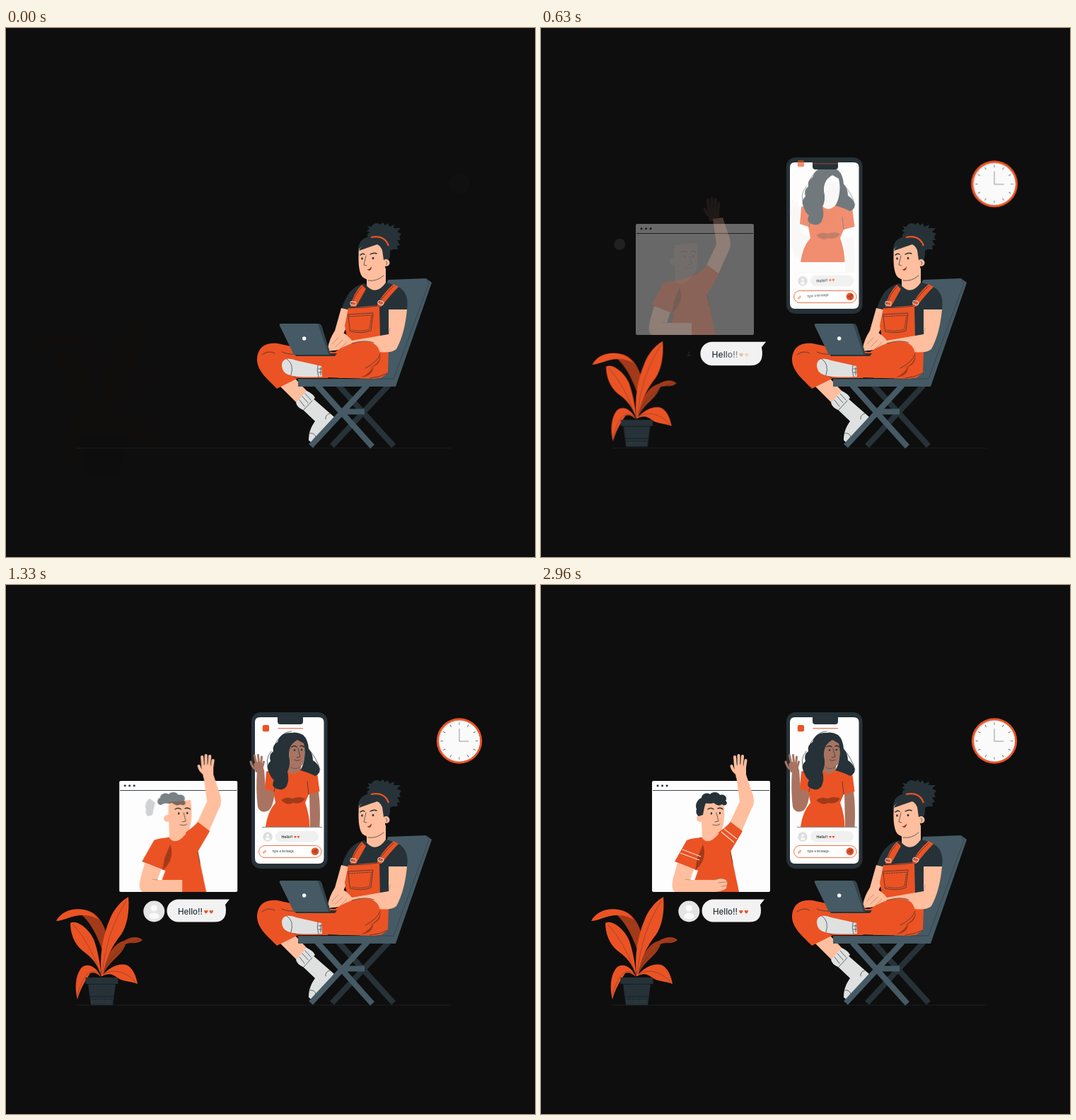
Animation, 748 px wide and 748 px high, one loop 3000 ms. Source, as an HTML page without scripts:

```html
<!DOCTYPE html>
<html lang="en">
<head>
<meta charset="utf-8">
<title>Video chat</title>
<style>
html, body { margin: 0; width: 100%; height: 100%; overflow: hidden; background: #0e0e0e; }
svg { display: block; width: 100vw; height: 100vh; }
text { font-family: Inter, "Open Sans", sans-serif; fill: #263238; }

.or { fill: #eb5324; }
.rust { fill: #a23a19; }
.ink { fill: #263238; }
.slate { fill: #455a64; }
.skin { fill: #ffbe9d; }
.tan { fill: #a87461; }
.sock { fill: #dfe1e1; }
.line { fill: none; stroke: #263238; stroke-width: .7; stroke-linecap: round; stroke-linejoin: round; }
.thick { stroke-width: 1.4; }
.fingers { fill: none; stroke-linecap: round; stroke-width: 4; }

/* springy entrances */
.enter, .fade, .row, .bust, .limb, .slide, .hair, .burn, .late {
  animation: 3s cubic-bezier(.36, -.01, .5, 1.38) infinite;
}
.enter { animation-name: enter; }
.fade { animation-name: fade; }
.row { animation-name: row; --from: translateY(-20px); }
.bust { animation-name: bust; --from: translateY(-40px); }
.limb { animation-name: limb; }
.slide { animation-name: slide; }
.hair { animation-name: hair; --from: translateX(-32px); }
.burn { animation-name: burn; --from: translateX(-32px); }
.late { animation-name: late; }

/* hand-timed parts */
.pane, .man, .part, .disc, .icon, .wipe, .note { animation: 3s linear infinite; }
.pane { animation-name: pane; }
.man { animation-name: man; }
.part { animation-name: part; }
.disc { animation-name: disc; transform-origin: 0 129px; }
.icon { animation-name: icon; transform-origin: 209px 460px; }
.wipe { animation-name: wipe; }
.note { animation-name: note; transform-origin: var(--at); }

@keyframes enter {
  0% { opacity: .013; transform: var(--from); animation-timing-function: cubic-bezier(.33, .18, .5, 1.36); }
  23%, 100% { opacity: 1; transform: none; }
}
@keyframes fade {
  0% { opacity: .013; animation-timing-function: cubic-bezier(.33, .18, .5, 1.36); }
  23%, 100% { opacity: 1; }
}
@keyframes row {
  0%, 5.5% { opacity: 0; transform: var(--from); }
  30.5%, 100% { opacity: 1; transform: none; }
}
@keyframes bust {
  0%, 9.7% { opacity: 0; transform: var(--from); }
  34.7%, 100% { opacity: 1; transform: none; }
}
@keyframes limb {
  0%, 18.5% { opacity: 0; }
  43.5%, 100% { opacity: 1; }
}
@keyframes slide {
  0% { transform: translateX(-55px); }
  50%, 100% { transform: none; }
}
@keyframes hair {
  0%, 33.5% { opacity: 0; transform: var(--from); }
  58.5%, 100% { opacity: 1; transform: none; }
}
@keyframes burn {
  0%, 38.3% { opacity: 0; transform: var(--from); }
  63.3%, 100% { opacity: 1; transform: none; }
}
@keyframes late {
  0%, 52% { opacity: 0; transform: translateX(-14px); }
  77%, 100% { opacity: 1; transform: none; }
}
@keyframes pane {
  0%, 7% { opacity: 0; }
  11% { opacity: .035; }
  21% { opacity: .38; }
  27.7% { opacity: .77; }
  36%, 100% { opacity: 1; }
}
@keyframes man {
  0%, 8% { opacity: 0; transform: translateX(-4px); }
  11% { opacity: .03; transform: translateX(-4px); }
  21% { opacity: .25; transform: translateX(-10px); }
  27.7% { opacity: .62; transform: translateX(-12px); }
  42%, 100% { opacity: 1; transform: none; }
}
@keyframes part {
  0%, 11% { opacity: 0; transform: translateX(-6px); }
  21% { opacity: .28; transform: translateX(-5px); }
  27.7% { opacity: .45; transform: translateX(-4px); }
  42%, 100% { opacity: 1; transform: none; }
}
@keyframes disc {
  0%, 8% { opacity: 0; transform: scale(0); }
  21% { opacity: .09; transform: scale(.53); }
  27.7% { opacity: .65; transform: scale(.85); }
  33.5% { opacity: 1; transform: scale(1.05); }
  37.7% { transform: scale(1.03); }
  42%, 100% { opacity: 1; transform: none; }
}
@keyframes icon {
  0%, 18% { opacity: 0; transform: scale(.2); }
  21% { opacity: .07; transform: scale(.35); }
  27.7% { opacity: .5; transform: none; }
  38%, 100% { opacity: 1; transform: none; }
}
@keyframes wipe {
  0% { transform: translateX(-130px); }
  35%, 100% { transform: none; }
}
@keyframes note {
  0%, 6% { opacity: 0; transform: translateY(-12px) rotate(-20deg); }
  11% { opacity: .5; transform: translateY(-5px) rotate(-16deg); }
  21% { opacity: .9; transform: rotate(-4deg); }
  25%, 100% { opacity: 1; transform: none; }
}
</style>
</head>
<body>
<svg viewBox="0 0 748 748">
<defs>
  <linearGradient id="edge" gradientUnits="userSpaceOnUse" x1="306" x2="351" y1="0" y2="0">
    <stop stop-color="#fff"/><stop offset="1" stop-color="#fff" stop-opacity="0"/>
  </linearGradient>
  <mask id="reveal" maskUnits="userSpaceOnUse" x="200" y="430" width="140" height="60">
    <rect class="wipe" x="100" y="430" width="400" height="60" fill="url(#edge)"/>
  </mask>
  <path id="heart" class="or" d="M0 2.7C-3.6 .4-2.8-2.4-1.2-2.2Q-.2-2 0-1 .2-2 1.2-2.2C2.8-2.4 3.6.4 0 2.7Z"/>
  <g id="user"><circle cy="-4" r="4.6"/><path d="M-7.5 9Q-7.5 2.5 0 2.5T7.5 9Q0 14.5-7.5 9Z"/></g>
</defs>

<path d="M100 594H629" stroke="#1d2123" stroke-width=".9"/>

<!-- clock -->
<g class="enter" style="--from:scale(.5);transform-origin:641px 220.5px">
  <circle class="or" cx="641" cy="220.5" r="32.2"/>
  <circle cx="641" cy="220.5" r="29.2" fill="#dedfe0"/>
  <circle cx="641.8" cy="220.8" r="28.2" fill="#fafafa"/>
  <circle cx="641" cy="220.5" r="24.5" fill="none" stroke="#455a64" stroke-width="3.4" pathLength="120" stroke-dasharray=".6 9.4" stroke-dashoffset=".3"/>
  <path class="line" stroke-opacity=".7" d="M641 203.500V221H654"/>
</g>

<!-- plant -->
<g class="enter" style="--from:scale(1.5);transform-origin:132px 517.5px">
  <path class="rust" d="M100 461C122 454 136 473 141 490L137 518C130 500 121 475 100 461Z"/>
  <path class="rust" d="M137 552C138 530 151 507 167 503 178 496 188 497 193 502 186 509 175 504 169 508 163 526 146 530 137 552Z"/>
  <path class="or" d="M71 475C78 461 95 456 110 459Q122 461 131 473 120 466 108 467C92 467 82 475 71 475Z"/>
  <path class="or" d="M135 553C132 525 136 498 147 472 153 457 164 446 173 441 175 462 171 482 163 494 150 510 140 530 137 553Z"/>
  <path class="or" d="M91 478C100 472 118 487 124 501 130 517 133 535 135 554 129 535 121 526 108 517 96 507 91 492 91 478Z"/>
  <path class="or" d="M134 554C128 539 114 533 106 542 98 553 97 570 101 586 105 571 112 560 119 549Q126 546 134 554Z"/>
  <path class="or" d="M136 552C146 541 160 533 172 538 180 543 184 553 186 564 176 560 165 561 157 555 150 549 143 549 136 553Z"/>
  <path class="line" stroke-opacity=".5" d="M136 550Q142 490 170 447M134 550Q118 505 95 480M132 550Q113 535 101 580M138 550Q160 538 183 561M139 545Q151 516 188 501"/>
  <path class="ink" d="M112.500 555H158.500V564H155L151 594H120L116 564H112.500Z"/>
  <path d="M116 564.500H155M119 582H152M120 586H151" stroke="#172023" fill="none"/>
  <path d="M121 588H150" stroke="#455a64" stroke-width="6" stroke-dasharray=".7 2.6" stroke-opacity=".5"/>
</g>

<!-- browser window -->
<g class="slide">
  <g class="pane">
    <rect x="157" y="277" width="167" height="157" rx="2" fill="#fdfdfd"/>
    <path d="M158 290.500H323" stroke="#263238" stroke-width=".9"/>
    <g class="ink"><circle cx="165" cy="283.7" r="1.5"/><circle cx="171.5" cy="283.7" r="1.5"/><circle cx="178" cy="283.7" r="1.5"/></g>
  </g>
  <g class="man">
    <path class="skin" d="M266 338L281 306 276 270 290 268 300 298Q303 309 297 318L282 352Z"/>
    <g class="part">
      <path class="skin" d="M276 273L273 257Q281 250 290 257L290 272Z"/>
      <path class="fingers" stroke="#ffbe9d" d="M275 256L274 243M279.500 255L279.500 241M284 255L285 242M288 258L289.500 248M276 266Q271 262 269.500 256"/>
      <path class="line" stroke-opacity=".35" d="M277 255V248M282 254V247M286 256V249"/>
    </g>
    <path class="or" d="M206 361C214 357 229 358 240 353 252 350 261 343 268 335L285 348 268 377 280 434H219L217 418 222 404 189 391Z"/>
    <path class="rust" d="M229 367C234 381 229 395 218 403L221 386Z"/>
    <path class="line" d="M268 377L271 393"/>
    <path class="skin" d="M193 393L216 402 211 417 246 417V434H190Q183 431 187 414Z"/>
    <path class="line" stroke-opacity=".4" d="M211 417L204 416"/>
    <g class="part">
      <path class="skin" d="M227 335L228 358Q237 369 251 352V340Z"/>
      <circle class="skin" cx="225" cy="330" r="5"/>
      <path class="skin" d="M227 307C226 322 226 334 229 343 235 355 248 355 256 345 260 335 260 318 258 304Z"/>
      <path class="line" d="M248 322L251 334 246 335M243 339Q249 341 253 338"/>
      <path class="line thick" d="M236 317Q240 314 244 317M250 316Q254 314 257 317"/>
      <g class="ink"><ellipse cx="241" cy="323" rx="1.2" ry="1.7"/><ellipse cx="253" cy="322.5" rx="1.2" ry="1.7"/></g>
    </g>
    <path class="hair ink" d="M229 311C223 312 221 303 227 301 227 295 235 293 239 296 243 291 251 293 253 297 260 295 264 301 261 305 266 309 260 314 256 310 251 314 247 310 244 308 239 311 234 306 229 311Z"/>
    <path class="burn ink" d="M225 302C219 306 218 313 220 317 218 322 221 326 223 327L229 325C230 319 231 314 233 308Z"/>
    <g class="late">
      <path class="skin" d="M244 417L252 415Q263 415 263.500 421L262 429Q255 434 244 434Z"/>
      <path class="line" stroke-opacity=".55" d="M251 421L263 420M255 426L263 425M245 417L252 415"/>
      <path fill="none" stroke="#ffd9c8" stroke-width="1.3" d="M200 374L226 384M197 379L224 389M255 349L273 364M259 345L277 359"/>
    </g>
  </g>
</g>

<!-- speech bubble -->
<g class="disc"><circle cx="209.3" cy="461.5" r="15" fill="#e4e4e4"/></g>
<g class="icon"><use href="#user" x="209.3" y="461" fill="#fafafa"/></g>
<g class="enter" style="--from:scale(0);transform-origin:272px 461px"><g class="fade">
  <path fill="#f2f2f2" d="M243.500 444.500H316L310 452Q311 456 311 460 311 476.500 295 476.500H243.500A16 16 0 0 1 243.500 444.500Z"/>
  <g mask="url(#reveal)">
    <text x="243" y="465.5" font-size="11.5" font-weight="500">Hello!!</text>
    <use href="#heart" x="282.8" y="462"/><use href="#heart" x="290.3" y="462"/>
  </g>
</g></g>

<!-- phone -->
<g class="enter" style="--from:translateY(-62px)"><g class="fade">
  <rect class="ink" x="347" y="180" width="107.5" height="221" rx="13"/>
  <path fill="#fdfdfd" d="M359 187H384V193Q384 197 388 197H416Q420 197 420 193V187H442Q449.500 187 449.500 194V386Q449.500 394 442 394H359Q352 394 352 386V194Q352 187 359 187Z"/>
  <g class="row">
    <circle cx="370" cy="356" r="6.7" fill="#dcdddd"/>
    <use href="#user" fill="#fafafa" transform="translate(370 356) scale(.43)"/>
    <rect x="381" y="348" width="61" height="15.6" rx="7.8" fill="#f0f0f0"/>
    <g class="note" style="--at:389px 358px">
      <text x="389.5" y="357.7" font-size="5.1" font-weight="600">Hello!!</text>
      <use href="#heart" transform="translate(409 356.2) scale(.62)"/><use href="#heart" transform="translate(413.5 356.2) scale(.62)"/>
    </g>
  </g>
  <rect x="357.5" y="368.5" width="88.5" height="17" rx="8.5" fill="#fff" stroke="#eb5324" stroke-width=".8"/>
  <circle class="or" cx="437" cy="376.7" r="5.4"/>
  <path class="line" style="stroke-width:.45" d="M434 376.700L440 374 438 380 436.500 377.500ZM436.500 377.500L440 374"/>
  <g class="note" style="--at:376px 378px">
    <path fill="none" stroke="#eb5324" stroke-width=".8" stroke-linecap="round" d="M364 378L366.500 375Q368 375.500 367 377L364.800 379.500Q363 379 364 377.500"/>
    <text x="376" y="378.3" font-size="4">Type a message..</text>
  </g>
  <g class="limb">
    <path d="M362 342.400H447" stroke="#455a64" stroke-width=".7"/>
    <path class="tan" d="M429 294L442 292Q445 315 443.500 342H430Z"/>
    <path class="tan" d="M367 287L380 292Q378 314 371 319 360 324 356 314 353 290 355 262L365 261Z"/>
    <path class="tan" d="M353 265L350 253Q356 247 363 253L365 264Z"/>
    <path class="fingers" stroke="#a87461" style="stroke-width:3" d="M354 253L351.500 241M357.500 252L356.500 240.500M360.500 253L361.500 243M352 260Q347 256 346 250M363 256L364.500 250"/>
    <path class="tan" d="M398 245V270Q406 278 416 268L418 250Z"/>
    <path class="tan" d="M398 228Q401 215 412 215L422 222Q424 241 420 253 414 261 406 258 398 254 398 228Z"/>
    <path class="line" stroke-opacity=".6" d="M403 258Q410 262 416 257"/>
    <path class="line" d="M413 231L416 243 411 244M408 247Q412 250 416 247"/>
    <path class="line thick" d="M404 229Q408 226 411 229M416 228Q419 226 421 229"/>
    <g class="ink"><circle cx="408" cy="233.5" r="1.3"/><circle cx="418" cy="233" r="1.3"/></g>
  </g>
  <g class="bust">
    <rect class="or" x="362.8" y="198" width="9.2" height="9.2" rx="2"/>
    <path d="M384.500 202.800H420" stroke="#eb5324"/>
    <path class="or" d="M368 264Q376 259 396 260 405 274 418 260 434 260 440 265L443.500 292 428 296 423 308Q429 324 429.500 342H367Q370 320 381 308L378 292 366 288Z"/>
    <path class="rust" d="M389 304Q397 298 405 302 414 298 423 302 417 311 406 308 398 313 389 304Z"/>
    <path class="line" d="M379 292L381 283M428 296L426 278"/>
    <path class="ink" d="M404 209C392 208 386 214 384 222Q376 227 378 235 371 240 374 249 367 255 371 263 374 272 379 276 374 285 383 288 392 292 397 284 401 275 398 264 403 254 400 242 399 226 412 219L421 224Q424 236 421 250 419 258 416 262 430 266 437 270 446 266 443 259 441 252 434 248 434 238 428 232 427 218 420 212 412 207 404 209Z"/>
    <path class="line" d="M381 224C387 214 394 207 404 207M375 235Q365 248 372 260M428 232Q440 246 444 261"/>
  </g>
</g></g>

<!-- chair and sitter -->
<path stroke="#263238" stroke-width="8" d="M470 505L548 591M541 505L461 591"/>
<path class="skin" d="M386 505L409 496 428 516 413 532Z"/>
<path class="sock" d="M432 522L464 550 434 588 428 583C428 571 432 563 437 556L418 538Z"/>
<path class="sock" d="M425 513Q434 517 437 523L420 540Q412 537 410 530Z"/>
<path class="line" d="M433 527L421 540M423 517L431 526M419 521L427 530M415 526L422 535M452 553Q451 547 458 545M430 573Q436 572 438 578"/>
<path stroke="#455a64" stroke-width="8" fill="none" d="M440 505L518 592M511 505L431 591M472 542.500H507"/>
<path class="slate" d="M540 356L594 354 602 360 551 507H413V496H500Z"/>
<path class="line" stroke-opacity=".7" d="M594 354.500L598 361 548 496H414"/>

<path class="skin" d="M510 340H537V362Q531 372 518 374 509 371 510 362Z"/>
<path class="ink" d="M507 361Q483 366 475 397L487 400 486 430 529 455H541V398H567Q570 377 558 368 548 362 537 360 522 381 507 361Z"/>
<path class="skin" d="M474 396L487 399 480 426 466 456 455 453Q457 440 465 428Z"/>
<path class="or" d="M484 396Q506 394 528 392L529 440 541 456 540 488 530 495H470L483 443 479 421Z"/>
<path class="or" d="M503 363L509 369 495 394H487Q491 375 503 363ZM548 362L555 366Q543 378 531 394H524Q530 378 548 362Z"/>
<path class="line" d="M503 366Q493 377 491 386M548 365Q536 376 529 386M486 396Q507 396 527 393"/>
<g fill="none" stroke="#cfd3d4" stroke-width="1.1"><rect x="487" y="387" width="8" height="5" rx="2" transform="rotate(10 491 389)"/><rect x="526" y="386" width="8" height="5" rx="2" transform="rotate(20 530 388)"/></g>
<path class="line" d="M484 405L519 403 516 428Q502 433 487 429Z"/>
<path class="line" stroke-dasharray="2 1.5" d="M485 408L517 406 514 426Q502 430 489 427"/>
<path class="or" d="M355 467C357 449 369 445 384 446L412 452 478 460 455 495H413L383 510C371 497 354 485 355 467Z"/>
<path class="line" d="M413 496L397 486M362 462Q371 455 380 460M390 458Q400 462 407 461"/>
<path class="skin" d="M541 398H567Q564 432 552 454 545 460 528 458L487 453 463 456 455 457Q465 440 477 431 485 436 489 442L541 433Z"/>
<path class="line" stroke-opacity=".4" d="M541 433L543 424M470 438L461 447M476 441L466 451M482 444L472 454"/>
<path class="or" d="M443 478Q462 455 492 445 526 438 529 461 541 461 540 482 537 495 520 496L447 494Z"/>
<path class="line" d="M529 461Q526 472 508 481M489 446Q508 440 520 445M540 488Q528 494 515 495"/>
<path class="rust" d="M519 478Q515 488 502 494 520 492 519 478ZM529 461Q529 475 513 481 532 477 529 461Z"/>
<path class="sock" d="M390 476C391 467 400 466 410 470L446 478 447 493C430 494 411 494 402 491 393 489 390 483 390 476Z"/>
<path class="line" d="M397 468Q408 475 403 491M441 477Q439 485 442 493M445 480V491M442 482H446M442 487H446"/>

<path class="ink" d="M407 460H468L465 464H410Z"/>
<path fill="#33454d" d="M439 418H443Q446 419 447 423L459 462H453Z"/>
<path class="slate" d="M389 418H439Q441 418 442 421L456 462H407L387 421Q386 418 389 418Z"/>
<circle cx="421.7" cy="439" r="2.7" fill="#fff"/>

<path class="ink" d="M519 298C509 298 509 291 515 289L510 287 514 284 511 280 517 281C519 275 527 275 529 278L533 275 536 279 540 276 542 281 549 278 548 283 558 283 553 288 559 291 556 295 558 300 553 300 557 307 553 308 554 313 547 313 540 316Z"/>
<path class="ink" d="M498 319Q496 301 510 296 530 290 541 307 546 320 540 330L533 342Z"/>
<circle class="skin" cx="537.5" cy="332" r="5"/>
<path class="skin" d="M499 313Q504 306 514 306 527 302 532 314L534 328 537 342C531 357 515 361 504 352 498 344 498 328 499 313Z"/>
<path class="ink" d="M499 315Q503 305 513 305 521 302 528 305L516 309Z"/>
<path fill="none" stroke="#eb5324" stroke-width="2.2" d="M516 296Q535 292 541 308"/>
<path class="line" d="M509 322L506 335 510 336M537 330Q540 330 538 335M512 357Q524 359 534 350"/>
<path class="line thick" d="M501 321Q504 318 507 320M515 320Q520 317 524 319"/>
<g class="ink"><ellipse cx="503.5" cy="326" rx="1.3" ry="1.8"/><ellipse cx="519" cy="325.5" rx="1.3" ry="1.8"/></g>
<path d="M510 341Q514 342 517 337 517 343 513 343Z" fill="#9d3920"/>
</svg>
</body>
</html>
```
